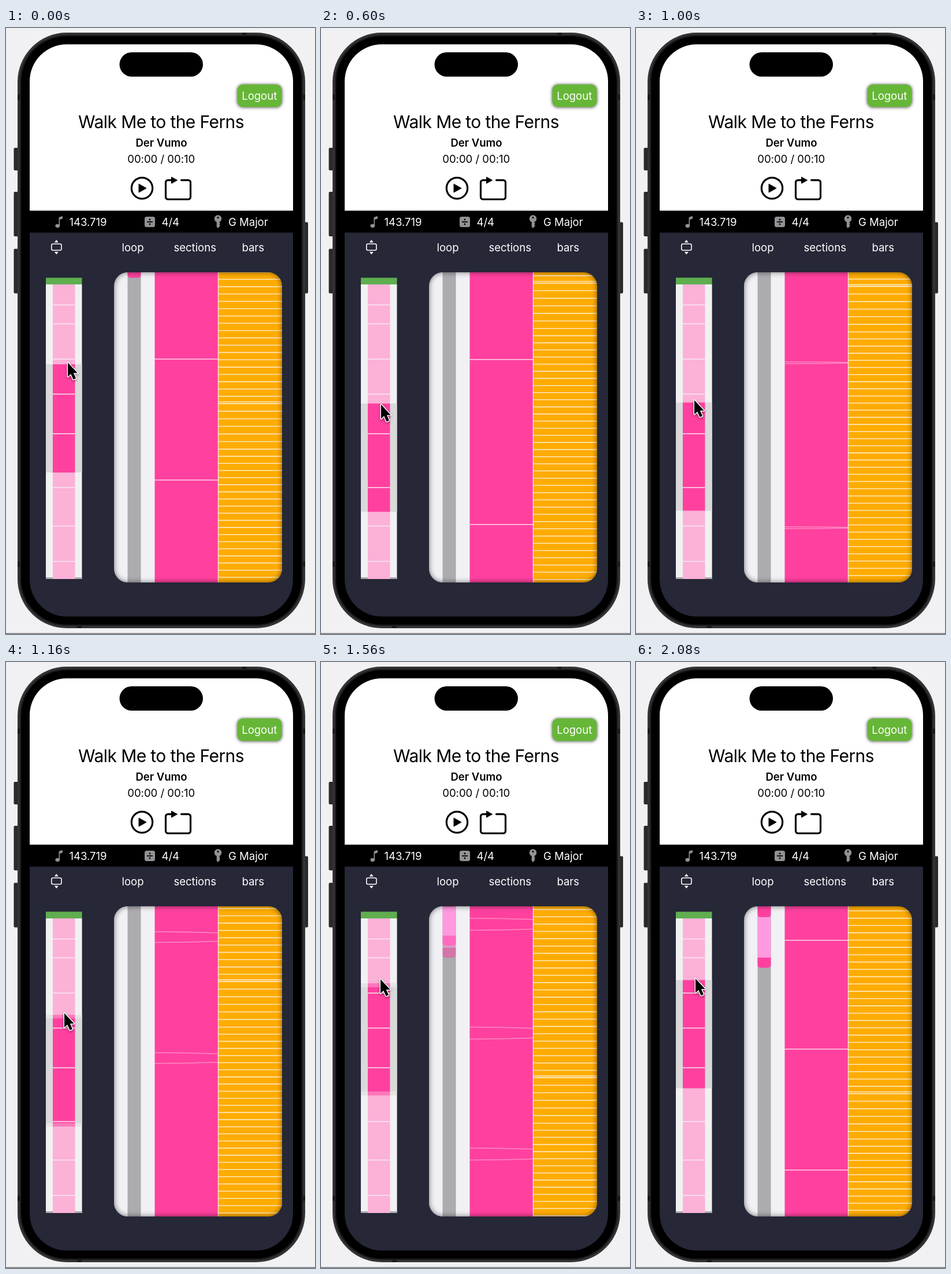
Recreate the animation shown at these times as an HTML page with a canvas. Size 535 by 1047 pixels, loop 2120 ms.

```html
<!DOCTYPE html>
<html lang="en">
<head>
<meta charset="utf-8">
<title>Song scroller</title>
<style>
  html, body { margin: 0; width: 100%; height: 100%; overflow: hidden; background: #f1f1f3; }
  #stage { position: relative; width: 535px; height: 1047px; overflow: hidden; }
  svg, canvas { position: absolute; left: 0; top: 0; }
  text { font-family: Inter, "Open Sans", sans-serif; font-size: 18.6px; letter-spacing: -.05px; }
  .title { font-size: 30px; letter-spacing: -.6px; }
  .artist { font-weight: 600; }
  .mid { text-anchor: middle; }
  .light { fill: #fff; }
  #rim {
    position: absolute; left: 187px; top: 422px; width: 291px; height: 536px;
    border-radius: 24px; box-shadow: inset 0 0 10px rgba(0, 0, 0, .55);
  }
</style>
</head>
<body>
<div id="stage">
  <svg width="535" height="1047" viewBox="0 0 535 1047">
    <defs>
      <clipPath id="screen"><rect x="41" y="28.3" width="456" height="988.5" rx="64"/></clipPath>
      <filter id="soft" x="-20%" y="-30%" width="140%" height="160%"><feGaussianBlur stdDeviation="2.5"/></filter>
    </defs>
    <path d="M0 1046.2H535" stroke="#77777a" stroke-width="1.5"/>
    <g fill="#2a2a2c">
      <rect x="13.5" y="207" width="9" height="39" rx="2"/>
      <rect x="13.5" y="283" width="9" height="77" rx="2"/>
      <rect x="13.5" y="381.5" width="9" height="77" rx="2"/>
      <rect x="514" y="335.5" width="9" height="123" rx="2"/>
    </g>
    <rect x="22" y="10" width="494" height="1025" rx="83" fill="#000" stroke="#343436" stroke-width="4"/>
    <rect x="25" y="13" width="488" height="1019" rx="80" fill="none" stroke="#1d1d1e" stroke-width="2.5"/>
    <g fill="#1b1b1c">
      <rect x="20" y="115" width="4" height="9"/><rect x="514" y="115" width="4" height="9"/>
      <rect x="20" y="922" width="4" height="9"/><rect x="514" y="922" width="4" height="9"/>
      <rect x="409" y="8" width="8" height="4"/><rect x="123" y="1033" width="8" height="4"/>
    </g>
    <g clip-path="url(#screen)">
      <rect x="41" y="28" width="456" height="288" fill="#fff"/>
      <rect x="41" y="315.6" width="456" height="38" fill="#000"/>
      <rect x="41" y="353.5" width="456" height="664" fill="#262737"/>
    </g>
    <rect x="196.5" y="42" width="144.5" height="42" rx="21"/>

    <rect x="399.5" y="97" width="79" height="41" rx="11" fill="#777" filter="url(#soft)"/>
    <rect x="400.5" y="97.5" width="77" height="39" rx="10" fill="#66b637"/>
    <text class="mid light" x="438.7" y="124">Logout</text>

    <text class="mid title" x="268.5" y="173">Walk Me to the Ferns</text>
    <text class="mid artist" x="269" y="205">Der Vumo</text>
    <text class="mid" x="268.7" y="233">00:00 / 00:10</text>

    <g fill="none" stroke="#000" stroke-width="3.2">
      <circle cx="235.5" cy="276.8" r="18.2"/>
      <path d="M303.5 262.8H315.5a4 4 0 0 1 4 4V292a4 4 0 0 1-4 4H280.5a4 4 0 0 1-4-4V266.8a4 4 0 0 1 4-4H288" stroke-linecap="round"/>
    </g>
    <path d="M230 269.5v14.6l13-7.3zM286.5 257.5v11l10-5.5z" stroke="#000" stroke-linejoin="round"/>

    <g fill="#929296">
      <ellipse cx="89.3" cy="341.8" rx="3.9" ry="3.1"/>
      <path d="M91.5 342V328.5q0-1.5 1.4-1.9l5.1-1.6v4.5l-4.9 1.6V342z"/>
      <rect x="240" y="326" width="18" height="18" rx="3.5"/>
      <circle cx="367" cy="329.5" r="6.2"/>
      <path d="M364.7 334h4.6v2l1.6 1.8-1.6 1.8 1.6 1.8-1.6 1.5-2.3 3-2.3-2.7z"/>
    </g>
    <circle cx="367" cy="327.5" r="1.6"/>
    <path d="M244 335h10" stroke="#000" stroke-width="1.8"/>
    <circle cx="249" cy="331" r="1.4"/><circle cx="249" cy="339" r="1.4"/>
    <g class="light">
      <text x="109.5" y="342">143.719</text>
      <text x="269.5" y="342">4/4</text>
      <text x="385" y="342">G Major</text>
      <text class="mid" x="219.5" y="386">loop</text>
      <text class="mid" x="327.2" y="386">sections</text>
      <text class="mid" x="427.7" y="386">bars</text>
      <path d="M83.8 370.5h7l-3.5-4.5zM83.8 386.7h7l-3.5 4.5z"/>
    </g>
    <rect x="78.8" y="373" width="17.2" height="11" rx="2.5" fill="none" stroke="#fff" stroke-width="1.6"/>
  </svg>
  <canvas id="view" width="535" height="1047"></canvas>
  <div id="rim"></div>
</div>
<script>
const WIDTH = 535, HEIGHT = 1047;
const LOOP = 2120, STEP = 40, WINDOW_H = 187, ZOOM = 3.07;
const PINK = '#ff409f', PALE = '#fcb1d7';
const view = document.getElementById('view').getContext('2d');
const layer = Object.assign(document.createElement('canvas'), { width: WIDTH, height: HEIGHT }).getContext('2d');
const marks = [478.5, 511, 572, 632.5, 701, 794, 860.5, 921.5];
const sectionOffsets = [-376, -188, 0, 209, 494, 697];

// [time, value] pairs
const windowKeys = [[0, 581], [400, 607], [760, 677], [820, 679], [1000, 647], [1320, 582.5], [1560, 558.5], [1800, 549.7], [2080, 549.5]];
const blurKeys = [[0, 0], [960, 0], [1000, 1], [1160, 6], [1320, 9.4], [1560, 6.8], [1680, 0], [2080, 0]];
const cursorXKeys = [[0, 107], [400, 105], [760, 103], [1000, 101], [1320, 101], [1560, 103], [2080, 103]];
const cursorYKeys = [[0, 578], [400, 611], [760, 675], [800, 676], [1000, 643], [1320, 574], [1560, 548], [2080, 547]];

// Monotone cubic interpolation
function sample(keys, t) {
  const last = keys.length - 1;
  if (t >= keys[last][0]) return keys[last][1];
  const slope = i => (keys[i + 1][1] - keys[i][1]) / (keys[i + 1][0] - keys[i][0]);
  const tangent = i => {
    if (i === 0 || i === last) return 0;
    const a = slope(i - 1), b = slope(i);
    return a * b > 0 ? 2 * a * b / (a + b) : 0;
  };
  const i = keys.findIndex((k, n) => n < last && t < keys[n + 1][0]);
  const [t0, v0] = keys[i], [t1, v1] = keys[i + 1];
  const span = t1 - t0, u = (t - t0) / span, w = 1 - u;
  return v0 * (1 + 2 * u) * w * w + v1 * u * u * (3 - 2 * u)
    + span * (tangent(i) * u * w * w - tangent(i + 1) * u * u * w);
}

const detailY = top => 572 - ZOOM * (top - 581);

function box(x, y, w, h, color) {
  layer.fillStyle = color;
  layer.fillRect(x, y, w, h);
}

function rule(x0, x1, y, width, color, bend = 0) {
  layer.strokeStyle = color;
  layer.lineWidth = width;
  layer.beginPath();
  layer.moveTo(x0, y);
  layer.quadraticCurveTo((x0 + x1) / 2, y, x1, y + bend);
  layer.stroke();
}

function handle(y, h) {
  layer.fillStyle = PINK;
  layer.beginPath();
  layer.roundRect(210.5, y, 23, h, [0, 0, 5, 5]);
  layer.fill();
}

function drawOverview(top) {
  box(69, 443, 62.5, 509, '#f1f1f2');
  box(69, 949, 62.5, 3, '#a9a9ad');
  box(81, 443, 38.5, 509, PALE);
  box(69, top, 62.5, WINDOW_H, '#d9d9da');
  box(81, top, 38.5, WINDOW_H, PINK);
  for (const y of marks) rule(81, 119.5, y, 1.5, '#f8e8f1');
  box(69, 431.5, 62.5, 11.5, '#5fae50');
}

function drawSections(y, bend) {
  box(187, 422, 71, 536, '#f1f1f5');
  box(210.5, 422, 23, 536, '#ababb0');
  box(210.5, y - 228, 23, 72, '#ff99e0');
  handle(y - 248, 20);
  handle(y - 158, 17.5);
  box(257.5, 422, 110, 536, PINK);
  for (const d of sectionOffsets) rule(257.5, 367, y + d, 1.5, '#ffd5ea', bend);
}

function drawBars(y) {
  box(367, 422, 111, 536, '#ffac02');
  const run = (from, pitch, count) => {
    for (let n = 0; n < count; n++) rule(368, 478, y + from + pitch * n, 1.6, '#ffe8bc');
    return from + pitch * count;
  };
  run(74, -12.63, 1);
  run(77, -12.63, 27);
  const middle = run(77, 13.1, 6);
  run(run(middle, 12.3, 20), 12.5, 28);
  box(366.8, 422, 1.4, 536, '#ffe3d8');
}

function drawCursor(x, y) {
  const arrow = new Path2D('M0 0V25.5L5.5 20.5 10 30.5 14.6 28.5 10.3 18.8H17.5Z');
  view.save();
  view.translate(x, y);
  view.scale(.96, .96);
  view.shadowColor = 'rgba(0,0,0,.4)';
  view.shadowBlur = 4;
  view.shadowOffsetY = 2;
  view.lineJoin = 'round';
  view.lineWidth = 3;
  view.strokeStyle = '#fff';
  view.stroke(arrow);
  view.shadowColor = 'transparent';
  view.fill(arrow);
  view.restore();
}

// Each exposure is painted whole, then mixed into the view.
function expose(top, side, blur, alpha) {
  const shifted = top + side * blur / 2;
  layer.clearRect(0, 0, WIDTH, HEIGHT);
  drawOverview(shifted);
  layer.save();
  layer.beginPath();
  layer.roundRect(187, 422, 291, 536, 24);
  layer.clip();
  drawSections(detailY(shifted), side * Math.min(blur, 2));
  drawBars(detailY(top));
  layer.restore();
  view.globalAlpha = alpha;
  view.drawImage(layer.canvas, 0, 0);
  view.globalAlpha = 1;
}

function draw(t) {
  const top = sample(windowKeys, t), blur = sample(blurKeys, t);
  view.clearRect(0, 0, WIDTH, HEIGHT);
  expose(top, -1, blur, 1);
  if (blur > .1) expose(top, 1, blur, .5);
  drawCursor(sample(cursorXKeys, t), sample(cursorYKeys, t));
}

const start = performance.now();
function tick() {
  const t = (performance.now() - start) % LOOP;
  draw(Math.floor(t / STEP) * STEP);
  requestAnimationFrame(tick);
}
tick();
</script>
</body>
</html>
```
